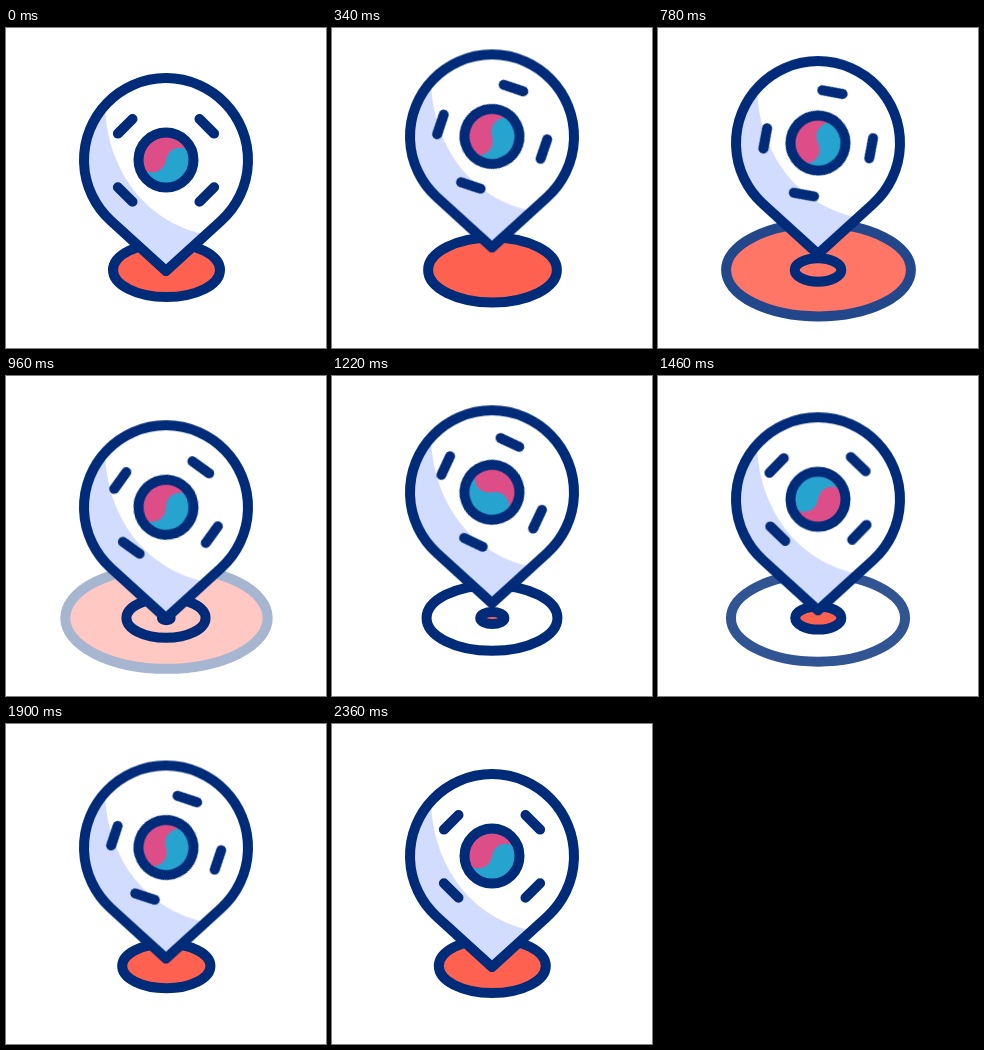
Animation of 320x320 px, one loop 2.4 s. Source, as an HTML page:

```html
<!DOCTYPE html>
<html lang="en">
<head>
<meta charset="utf-8">
<title>Map pin</title>
<style>
  html, body { margin: 0; width: 100%; height: 100%; overflow: hidden; background: #fff; }
  svg { display: block; width: 100%; height: 100%; }

  .line { stroke: #002b79; stroke-width: 10; stroke-linecap: round; stroke-linejoin: round; }
  .red { fill: #ff6150; }

  .pin, .flag, .ring {
    animation-duration: 2400ms;
    animation-iteration-count: infinite;
    animation-timing-function: cubic-bezier(.333, 0, .667, 1);
  }
  .pin { animation-name: bounce; }
  .flag { animation-name: spin; }
  .fading { animation-name: spread, fade; }
  .hollow { animation-name: ripple, ripple-fade; }
  .fresh { animation-name: grow, appear; }

  @keyframes bounce {
    0%, 41.7%, 68.3%, 96.3%, 100% { transform: translateY(0); }
    23% { transform: translateY(-35px); }
    53.3% { transform: translateY(-17.7px); }
    79.2% { transform: translateY(-8.5px); }
  }
  /* wind up backwards, then one full turn */
  @keyframes spin {
    0% { transform: rotate(0deg); }
    23.3% { transform: rotate(-40deg); }
    26.7% { transform: rotate(-40deg); animation-timing-function: cubic-bezier(.46, 0, .54, 1); }
    91.7%, 100% { transform: rotate(360deg); }
  }

  @keyframes spread {
    0% { rx: 53.5px; ry: 27px; }
    48%, 100% { rx: 105px; ry: 52.7px; }
  }
  @keyframes fade {
    0%, 27.9% { opacity: 1; }
    48%, 100% { opacity: 0; }
  }
  @keyframes ripple {
    0%, 14.4% { rx: 3px; ry: 1.5px; }
    77.8%, 100% { rx: 105px; ry: 52.7px; }
  }
  @keyframes ripple-fade {
    0%, 14.39% { opacity: 0; }
    14.4%, 54.2% { opacity: 1; }
    77.8%, 100% { opacity: 0; }
  }
  @keyframes grow {
    0%, 34% { rx: 3px; ry: 1.5px; }
    96.4%, 100% { rx: 53.5px; ry: 27px; }
  }
  @keyframes appear {
    0%, 33.99% { opacity: 0; }
    34%, 100% { opacity: 1; }
  }
</style>
</head>
<body>
<svg viewBox="0 0 320 320">
  <defs>
    <path id="drop" d="M160 243L104.7 192.6A82 82 0 1 1 215.3 192.6Z"/>
    <clipPath id="inside"><use href="#drop"/></clipPath>
  </defs>

  <ellipse class="line red ring fading" cx="160.5" cy="242" rx="53.5" ry="27"/>
  <ellipse class="line ring hollow" cx="160" cy="242" rx="3" ry="1.5" fill="none"/>
  <ellipse class="line red ring fresh" cx="160.3" cy="242" rx="3" ry="1.5"/>

  <g class="pin">
    <use href="#drop" fill="#fff"/>
    <path d="M99 68C97 140 140 196 202 207L160 260L60 200V68Z" fill="#d2dcff" clip-path="url(#inside)"/>
    <use href="#drop" class="line" fill="none"/>
    <g transform="translate(160 132)">
      <g class="flag">
        <circle r="27.5" fill="#dd4d88"/>
        <path d="M26 -9L17 -12C4 -14 1 -4 0 0C-1 4 -4 14 -17 12L-26 9A27.5 27.5 0 0 0 26 -9Z" fill="#27a3d0"/>
        <circle class="line" r="27.5" fill="none"/>
        <path class="line" fill="none" d="M33.5 -41l14.6 14.6M33.5 41.8l14.6 -14.6M-33.5 -41l-14.6 14.6M-33.5 41.8l-14.6 -14.6"/>
      </g>
    </g>
  </g>
</svg>
</body>
</html>
```
